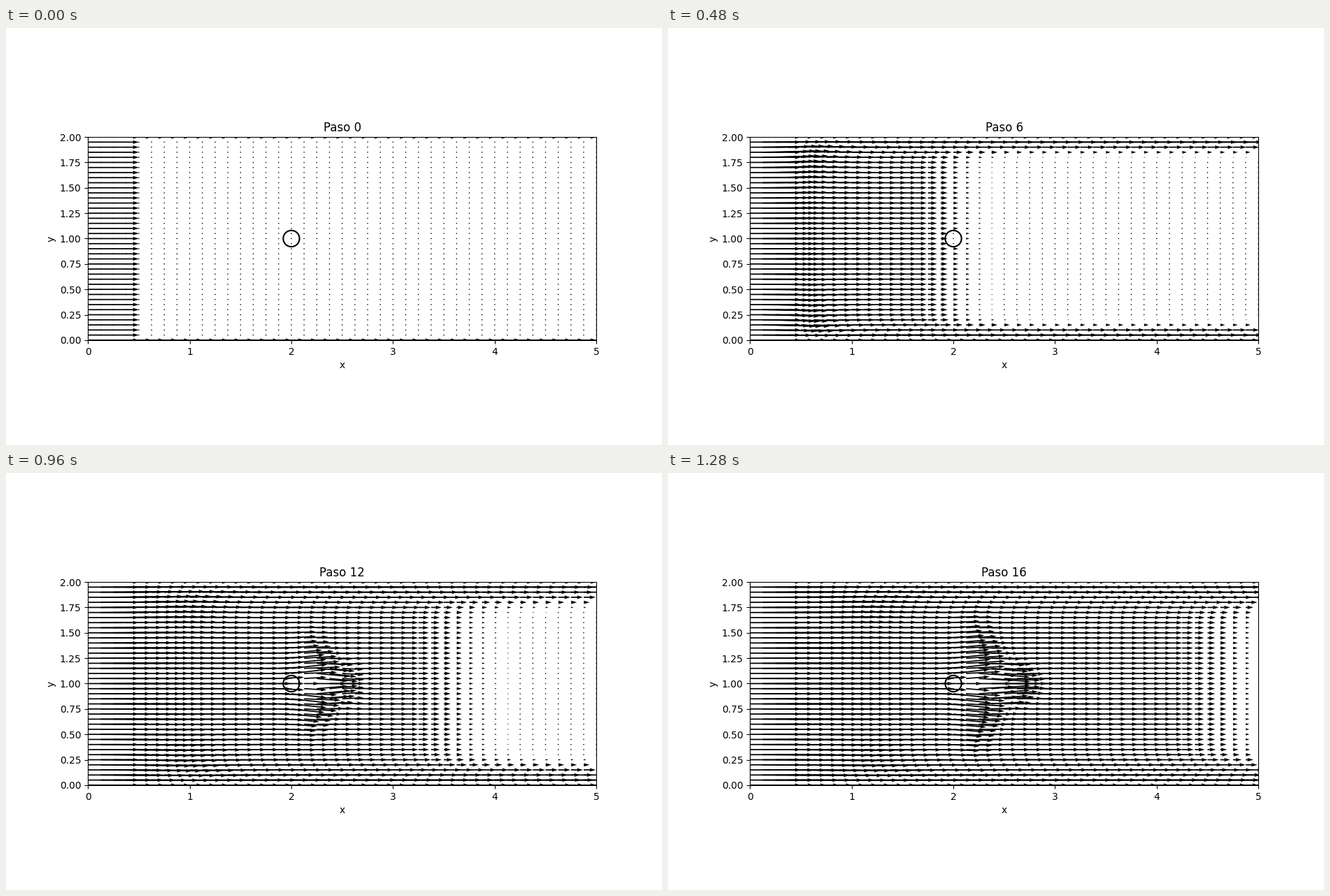
A matplotlib script for the animation above (1.36 s loop, 938 by 597 pixels).

```python
import math

import numpy as np
import matplotlib.pyplot as plt
from matplotlib.animation import FuncAnimation

STEPS = 17
LENGTH, HEIGHT = 5, 2
CELLS = 40
OBSTACLE, RADIUS = (2, 1), 0.08
WALL_DIFFUSION = 0.000665

erfc = np.vectorize(math.erfc, otypes=[float])

x, y = np.meshgrid(np.linspace(0, LENGTH, CELLS + 1),
                   np.linspace(0, HEIGHT, CELLS + 1))
col = x * CELLS / LENGTH
off = y - OBSTACLE[1]
dist = np.abs(off)
side = np.where(dist < 1e-6, 0, np.sign(off))
solid = np.hypot(x - OBSTACLE[0], off) <= RADIUS + 1e-6


def bump(value, center, width):
    return np.exp(-((value - center) / width) ** 2)


def channel(n):
    """Inflow: a fast pressure front followed by a slow, steeper one."""
    front = 0.25 * erfc((col - 2.05 * n - 0.2) / (3.15 * n ** (1 / 3)))
    center, width = 0.45 * n - 0.6, 0.6 + 0.2 * n
    u = front + 0.25 * erfc((col - center) / width)
    spread = dist ** 2 * np.tanh((1 - dist) / 0.12)
    amp = 0.065 - 0.0015 * n
    v = amp * side * spread * bump(col, center + 1, width + 1)
    return u, v


def obstacle(n, u, v):
    """Flow is pushed around the circle and closes again behind it."""
    grow = min(max((n - 7) / 5, 0), 1)
    if grow == 0:
        return u, v
    age = n - 7
    reach = 16.8 + age * (0.08 + 0.35 * bump(dist, 0, 0.25))
    ahead = 0.5 * erfc((col - reach) / 1.1) * 0.5 * erfc((15.6 - col) / 0.5)
    span = 0.16 + 0.035 * age
    u = u + 0.28 * grow * ahead * np.exp(-(dist / span) ** 4)

    wake = bump(col, 17, 0.9) * bump(dist, 0, 0.08)
    u = u * (1 - 0.6 * wake)

    fan = bump(col, 16.2, 1.1) * bump(dist, 0.12, span)
    close = bump(col, 18 + 0.1 * age, 1.5) * bump(dist, 0.1, 0.12)
    return u, v + side * grow * (0.085 * fan - 0.075 * close)


def velocity(n):
    u, v = np.zeros_like(x), np.zeros_like(x)
    if n > 0:
        u, v = obstacle(n, *channel(n))
        u[solid] = v[solid] = 0
        depth = 2 * math.sqrt(WALL_DIFFUSION * n)
        rest = (1 - erfc(y / depth)) * (1 - erfc((HEIGHT - y) / depth))
        u = 1 - (1 - u) * rest
        v = v * rest
    u[:, 0] = u[0] = u[-1] = 1
    v[:, 0] = v[0] = v[-1] = 0
    return u, v


fig, ax = plt.subplots(figsize=(9.38, 5.97), dpi=100)
ax.set_aspect("equal")
ax.set(xlim=(0, LENGTH), ylim=(0, HEIGHT), xlabel="x", ylabel="y")
ax.set_xticks(range(LENGTH + 1))
ax.set_yticks(np.linspace(0, HEIGHT, 9))
title = ax.set_title("Paso 0")
arrows = ax.quiver(x, y, *velocity(0), scale=10, width=0.0024)
ax.add_patch(plt.Circle(OBSTACLE, RADIUS, fill=False, lw=1.5))


def update(n):
    arrows.set_UVC(*velocity(n))
    title.set_text(f"Paso {n}")
    return arrows, title


anim = FuncAnimation(fig, update, frames=STEPS, interval=80,
                     repeat=True, repeat_delay=0)
plt.show()
```
